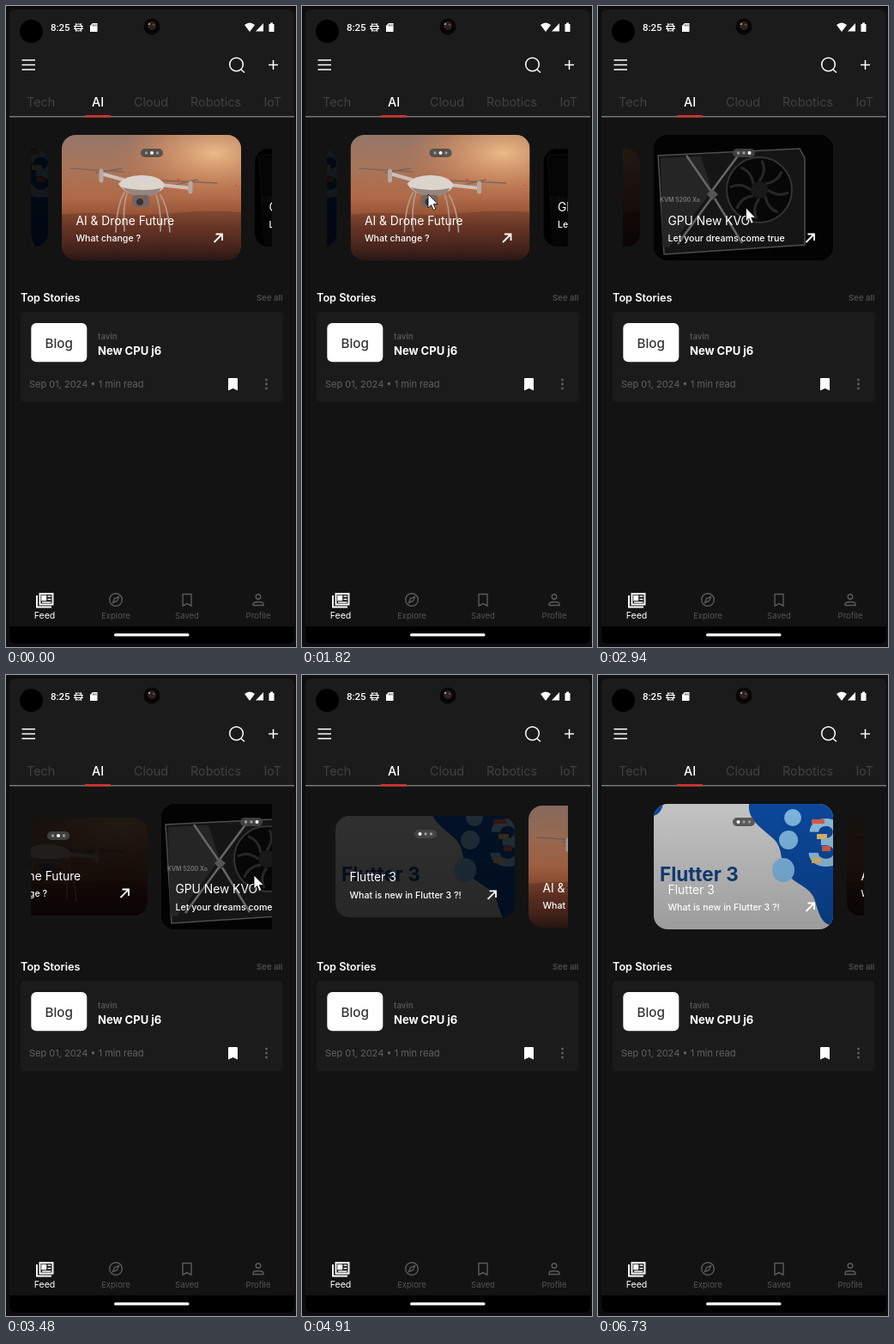
These frames come from a looping animation (338 by 746 pixels, 6.79 s). An HTML page:

```html
<!DOCTYPE html>
<html lang="en">
<head>
<meta charset="utf-8">
<title>News feed</title>
<style>
html, body { margin: 0; width: 100%; height: 100%; overflow: hidden; background: #0e0e10; }
svg { display: block; width: 338px; height: 746px; font-family: Inter, sans-serif; }
text { white-space: pre; }
.line { fill: none; stroke: #fff; stroke-width: 1.5; }
.tab { font-size: 14.4px; fill: #414141; }
.nav { font-size: 9.5px; fill: #555; text-anchor: middle; }
.dim { stroke: #5a5a5a; stroke-width: 1.4; }
</style>
</head>
<body>
<svg viewBox="0 0 338 746">
  <defs>
    <linearGradient id="sky" x2="0" y2="1">
      <stop offset="0" stop-color="#94766a"/><stop offset=".25" stop-color="#a8765c"/>
      <stop offset=".5" stop-color="#b06a48"/><stop offset=".62" stop-color="#9a5638"/>
      <stop offset=".72" stop-color="#6a3626"/><stop offset=".88" stop-color="#4a261d"/>
      <stop offset="1" stop-color="#2a1714"/>
    </linearGradient>
    <radialGradient id="sun" cx=".85" cy=".2" r=".55">
      <stop offset="0" stop-color="#f3c38c" stop-opacity=".9"/>
      <stop offset=".5" stop-color="#dc9868" stop-opacity=".6"/>
      <stop offset="1" stop-color="#c67a50" stop-opacity="0"/>
    </radialGradient>
    <linearGradient id="shade" x2="0" y2="1">
      <stop offset="0" stop-opacity="0"/><stop offset="1" stop-opacity=".2"/>
    </linearGradient>
    <clipPath id="view"><rect x="29" y="140" width="281" height="170"/></clipPath>

    <g id="art0">
      <rect width="209" height="146" fill="#c3c3c3"/>
      <path d="M111 0C109 20 128 29 140 41S146 69 156 82S183 96 188 113S196 140 209 142V0ZM0 0H11Q9 11 0 14Z" fill="#0b479a"/>
      <g fill="#7db4de">
        <circle cx="162" cy="16" r="10"/><circle cx="157" cy="42" r="11"/><ellipse cx="151" cy="77" rx="13" ry="14"/>
      </g>
      <text x="177" y="72" font-size="74" font-weight="700" fill="#8ebadb">3</text>
      <path d="M184 18h15v5h-15zM196 49h10v6h-10z" fill="#d85a42"/>
      <path d="M190 35h12v6h-12zM184 63h11v6h-11z" fill="#d9b767"/>
      <text x="7" y="90" font-size="22.5" font-weight="700" fill="#123e7c">Flutter 3</text>
      <rect width="209" height="146" fill="url(#shade)"/>
    </g>

    <g id="art1">
      <rect width="209" height="146" fill="url(#sky)"/>
      <rect width="209" height="105" fill="url(#sun)"/>
      <path d="M0 93Q30 89 60 92T130 91T209 90V104H0Z" fill="#6a3828" opacity=".5"/>
      <g fill="none" stroke-linecap="round">
        <path d="M10 39L72 43M113 53L181 56M40 44L70 39M125 60L158 52" stroke="#80645a" stroke-width="1.5"/>
        <path d="M46 45L78 54M105 57L150 62" stroke="#cfc0b8" stroke-width="4"/>
        <path d="M46 42V53M150 56V66" stroke="#b7a8a0" stroke-width="5"/>
        <path d="M73 67Q64 82 63 113M115 70Q124 84 126 113M76 68Q71 84 73 112M110 70Q116 86 115 112" stroke="#b49c90" stroke-width="1.6"/>
      </g>
      <path d="M66 57Q75 46 95 47T120 58Q118 68 97 70T66 57Z" fill="#ddd3cd"/>
      <path d="M70 61Q92 67 116 62Q112 71 97 72T70 61Z" fill="#94857e"/>
      <rect x="82" y="70" width="20" height="14" rx="4" fill="#736461"/>
      <circle cx="91" cy="78" r="4" fill="#3c3231"/>
      <circle cx="136" cy="52" r="1.2" fill="#e43b27"/><circle cx="203" cy="59" r="1" fill="#e43b27"/>
    </g>

    <g id="art2">
      <rect width="209" height="146" fill="#030303"/>
      <path d="M5 24L170 16L176 27V128L12 139Z" fill="#151515" stroke="#4d4d4d" stroke-width="1.5"/>
      <path d="M8 27L55 25L68 65L18 131L10 130Z" fill="#252525"/>
      <circle cx="123" cy="64" r="38" fill="#070707" stroke="#343434" stroke-width="2"/>
      <g fill="none" stroke="#272727" stroke-width="3">
        <path id="blade" d="M123 54Q132 42 126 30"/>
        <use href="#blade" transform="rotate(45 123 64)"/><use href="#blade" transform="rotate(90 123 64)"/>
        <use href="#blade" transform="rotate(135 123 64)"/><use href="#blade" transform="rotate(180 123 64)"/>
        <use href="#blade" transform="rotate(225 123 64)"/><use href="#blade" transform="rotate(270 123 64)"/>
        <use href="#blade" transform="rotate(315 123 64)"/>
      </g>
      <circle cx="123" cy="64" r="10" fill="#191919"/>
      <path d="M38 24L67 66L99 23M67 74L28 127M71 74L103 126" fill="none" stroke="#666" stroke-width="2.5"/>
      <path d="M62 69L68 63L75 69L68 76Z" fill="#555"/>
      <text x="7" y="78" font-size="7" font-weight="600" fill="#777">KVM 5200 Xo</text>
    </g>
  </defs>

  <rect x="4" y="4" width="332" height="738" rx="8" fill="#131313"/>
  <path d="M4 129V12Q4 4 12 4H328Q336 4 336 12V129Z" fill="#1b1b1b"/>
  <path d="M4 722H336V734Q336 742 328 742H12Q4 742 4 734Z" fill="#000"/>
  <rect x="126" y="730.3" width="87.5" height="3.2" rx="1.6" fill="#fff"/>

  <!-- status bar -->
  <circle cx="29.5" cy="29.5" r="13.5" fill="#000"/>
  <circle cx="170" cy="24" r="9.5" fill="#060606"/>
  <circle cx="170" cy="23" r="5" fill="#2b211d"/>
  <circle cx="167" cy="21" r="1.2" fill="#a39b96"/><circle cx="172" cy="22" r="1" fill="#77645a"/>
  <text x="52" y="29" font-size="11.5" font-weight="500" fill="#fff" style="font-family:Roboto,sans-serif">8:25</text>
  <g class="line" style="stroke-width:1.2">
    <circle cx="84.5" cy="25" r="4"/>
    <path d="M79 23.5H90M79 26.5H90M81 20.5L82.5 22M88 20.5L86.5 22M81 29.5L82.5 28M88 29.5L86.5 28"/>
  </g>
  <path d="M101 20H106.5V30H98V23Z" fill="#fff"/>
  <path d="M101.5 21.5V23.5M103.2 21.5V23.5M105 21.5V23.5" stroke="#1b1b1b" stroke-width=".8"/>
  <path d="M278 22Q284 17 290 22L284 30ZM300 20V29.5H291ZM306.5 21H308V19.5H311V21H312.5V30H306.5Z" fill="#fff"/>

  <!-- app bar and tabs -->
  <g class="line">
    <path d="M18.500 63H34M18.500 68.500H34M18.500 74H34M306 68.500H317M311.500 63V74"/>
    <circle cx="268.500" cy="68" r="7.800"/><path d="M274 74L278 77.500"/>
  </g>
  <text class="tab" x="24" y="117">Tech</text>
  <text class="tab" x="100" y="117" style="fill:#fff" font-weight="500">AI</text>
  <text class="tab" x="149" y="117">Cloud</text>
  <text class="tab" x="215" y="117">Robotics</text>
  <text class="tab" x="300.5" y="117">IoT</text>
  <rect x="4" y="128" width="332" height="1.5" fill="#747874"/>
  <rect x="92" y="127" width="30" height="2.5" fill="#d3302f"/>

  <g id="cards" clip-path="url(#view)"></g>

  <!-- stories -->
  <text x="17" y="343.5" font-size="12.7" font-weight="600" fill="#fff">Top Stories</text>
  <text x="292" y="342.5" font-size="9.6" font-weight="600" fill="#4d4d4d">See all</text>
  <rect x="17" y="356" width="306" height="105" rx="5" fill="#1b1b1b"/>
  <rect x="29.3" y="369" width="65" height="45.3" rx="6" fill="#fff"/>
  <text x="45.5" y="398" font-size="15.2" font-weight="500" fill="#333">Blog</text>
  <text x="107" y="387.5" font-size="9.5" font-weight="600" fill="#555">tavin</text>
  <text x="107" y="405.5" font-size="13" font-weight="700" fill="#fff">New CPU j6</text>
  <text x="27" y="444" font-size="11" fill="#626262">Sep 01, 2024 • 1 min read</text>
  <path d="M259 434Q259 433 260 433H269Q270 433 270 434V447.5L264.5 445L259 447.5Z" fill="#fff"/>
  <g fill="#5a5a5a"><circle cx="303.5" cy="435" r="1.5"/><circle cx="303.5" cy="440" r="1.5"/><circle cx="303.5" cy="445" r="1.5"/></g>

  <!-- navigation -->
  <g class="line">
    <path d="M39.5 684H54.5V696.5H39.5ZM36 686V699.500H53" stroke-width="1.900"/>
    <path d="M42 686.500H46.500V691.500H42Z" style="fill:#fff"/>
    <path d="M48.500 687H52.500M48.500 690.500H52.500M42 694H52.500" stroke-width="1.700"/>
    <g class="dim">
      <circle cx="128" cy="691" r="7.3"/><path d="M131.5 687.5L129.5 692.5L124.5 694.5L126.5 689.5Z"/>
      <path d="M206 684.5H216V698L211 695.5L206 698Z"/>
      <circle cx="294" cy="687.5" r="2.8"/><path d="M288 697.5V695.5Q289 693.5 294 693.5T300 695.5V697.5Z"/>
    </g>
  </g>
  <text class="nav" x="45" y="713" style="fill:#fff;font-size:10.6px">Feed</text>
  <text class="nav" x="128" y="713">Explore</text>
  <text class="nav" x="211" y="713">Saved</text>
  <text class="nav" x="294" y="713">Profile</text>

  <path id="cursor" d="M0 0V16L3.7 12.6L6.2 18.5L8.8 17.3L6.3 11.6H11.3Z" fill="#fff" stroke="#000" stroke-width=".8"/>
</svg>
<script>
const LOOP = 6790, PAGE = 225, INSET = 16, RESIZE = 750;
const stories = [
  ['Flutter 3', 'What is new in Flutter 3 ?!'],
  ['AI & Drone Future', 'What change ?'],
  ['GPU New KVO', 'Let your dreams come true'],
];
// [time, value]
const scroll = [[1740, 0], [1820, 8.5], [1936, 112], [2080, 205], [2200, 225], [3230, 225], [3480, 109],
  [3640, 45], [3800, 14], [4030, 1], [4120, 0], [4610, 0], [4765, -112], [4910, -199], [5030, -221], [5150, -225]];
const mouseX = [[1420, 157], [1740, 156], [1820, 147], [1936, 70], [2090, 24], [2200, -16], [2500, -16],
  [2780, 172], [3230, 173], [3480, 289], [3600, 342], [3810, 342], [4030, 87], [4610, 88], [4765, 200], [4885, 312]];
const mouseY = [[1420, 245], [1740, 220], [1820, 219], [2090, 245], [2200, 290], [2500, 326],
  [2780, 236], [3480, 233], [3810, 238], [4030, 221], [4610, 222], [4765, 260], [4885, 388]];

// Monotone cubic through the keys
function track(keys, t) {
  const last = keys.length - 1;
  const slope = j => (keys[j + 1][1] - keys[j][1]) / (keys[j + 1][0] - keys[j][0]);
  const tangent = j => {
    if (j === 0 || j === last) return 0;
    const a = slope(j - 1), b = slope(j);
    return a * b > 0 ? 2 * a * b / (a + b) : 0;
  };
  let i = 0;
  while (i < last - 1 && t > keys[i + 1][0]) i++;
  const [t0, v0] = keys[i], [t1, v1] = keys[i + 1], d = t1 - t0;
  const u = Math.min(1, Math.max(0, (t - t0) / d)), w = 1 - u;
  return v0 * w * w * (1 + 2 * u) + v1 * u * u * (3 - 2 * u)
    + d * u * w * (tangent(i) * w - tangent(i + 1) * u);
}

// cubic-bezier(.4, 0, .2, 1)
function ease(p) {
  if (p <= 0) return 0;
  if (p >= 1) return 1;
  let lo = 0, hi = 1, m = .5;
  for (let i = 0; i < 20; i++) {
    m = (lo + hi) / 2;
    const x = 1.2 * m * (1 - m) ** 2 + .6 * m * m * (1 - m) + m ** 3;
    if (x < p) lo = m; else hi = m;
  }
  return m * m * (3 - 2 * m);
}

const box = document.getElementById('cards');
box.innerHTML = stories.map(([title, note], i) => `
  <g>
    <clipPath id="round${i}"><rect width="209" rx="16"/></clipPath>
    <g clip-path="url(#round${i})"><rect width="209" height="146"/><use href="#art${i}"/></g>
    <g><rect x="92" y="16" width="26" height="10" rx="5" fill="#484848" fill-opacity=".85"/>
      ${[0, 1, 2].map(k => `<circle cx="${98.5 + k * 6.5}" cy="21" r="${k === i ? 2 : 1.7}" fill="${k === i ? '#fff' : '#999'}"/>`).join('')}</g>
    <g fill="#fff">
      <text x="16.5" y="104.5" font-size="13.8">${title.replace('&', '&amp;')}</text>
      <text x="16.5" y="124" font-size="10.6" font-weight="500">${note}</text>
      <path class="line" d="M177.5 125L187 115.5M179.5 115.5H187V123" style="stroke-width:1.8"/>
    </g>
  </g>`).join('');

const cards = [...box.children].map(root => {
  const [, art, dots, label] = root.children;
  return { root, dots, label, use: art.querySelector('use'), clip: root.querySelector('clipPath rect') };
});
const cursor = document.getElementById('cursor');
const move = (el, x, y) => el.setAttribute('transform', `translate(${x} ${y})`);

function draw(t) {
  const s = track(scroll, t);
  const [a, b, c] = [1936, 3476, 4765].map(at => ease((t - at) / RESIZE));
  const active = [c, 1 - a + b - c, a - b];
  cards.forEach((card, i) => {
    const inset = INSET * (1 - active[i]);
    move(card.root, 65 + (i - 1) * PAGE - s, 150);
    move(card.dots, 0, inset);
    move(card.label, 0, -inset);
    card.clip.setAttribute('y', inset);
    card.clip.setAttribute('height', 146 - 2 * inset);
    card.use.setAttribute('opacity', .14 + .86 * active[i]);
  });
  move(cursor, track(mouseX, t), track(mouseY, t));
  cursor.style.display = t >= 1420 && t < 4890 ? '' : 'none';
}

let start;
function frame(now) {
  start ??= now;
  draw((now - start) % LOOP);
  requestAnimationFrame(frame);
}
draw(0);
requestAnimationFrame(frame);
</script>
</body>
</html>
```
